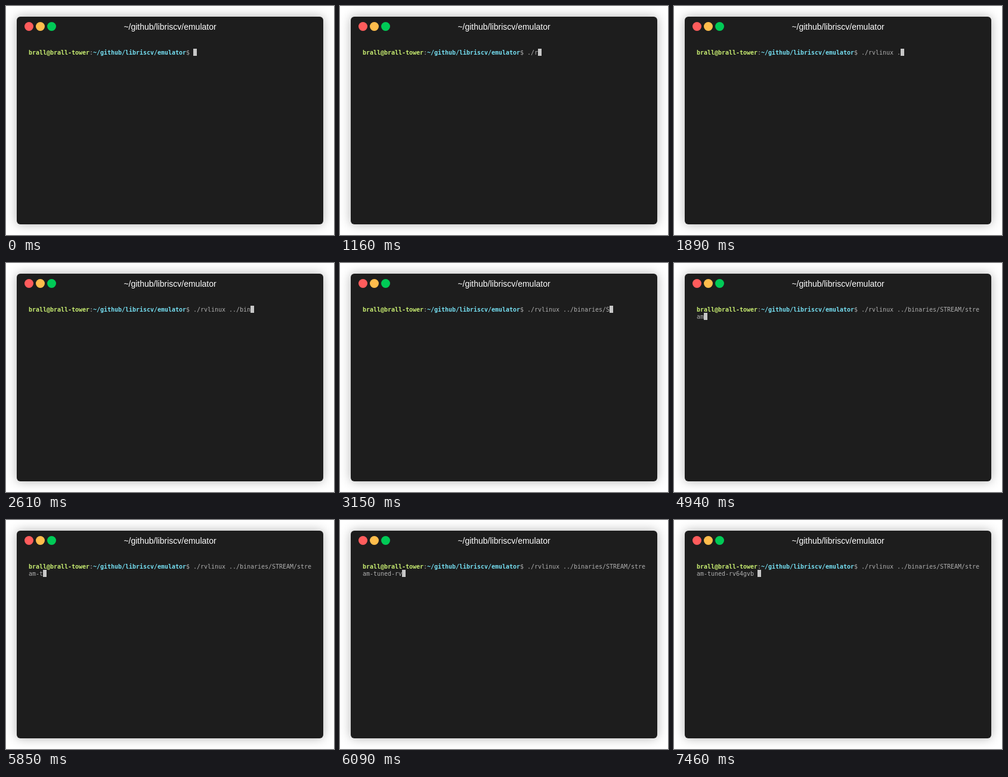
Write an HTML page with a canvas that moves like this. It is 550x386 px and loops after 8 s.

```html
<!DOCTYPE html>
<html lang="en">
<head>
<meta charset="utf-8">
<title>Terminal</title>
<style>
  html, body { margin: 0; width: 100%; height: 100%; overflow: hidden; background: #fff; }
  .window {
    position: absolute; left: 18px; top: 18px; width: 514px; height: 350px;
    border-radius: 6px; background: #1d1d1d; box-shadow: 0 0 18px rgba(0, 0, 0, 0.3);
  }
  .buttons { position: absolute; left: 13px; top: 9px; display: flex; gap: 4px; }
  .buttons i { width: 15px; height: 15px; border-radius: 50%; }
  .title {
    position: absolute; left: 0; right: 0; top: 9px; text-align: center; color: #fff;
    font: 14px/16px "Liberation Sans", Arial, sans-serif;
  }
  canvas { position: absolute; left: 20px; top: 54px; }
</style>
</head>
<body>
<div class="window">
  <div class="buttons">
    <i style="background: #ff5c5c"></i>
    <i style="background: #ffbd4c"></i>
    <i style="background: #00ca56"></i>
  </div>
  <div class="title">~/github/libriscv/emulator</div>
  <canvas id="screen" width="474" height="276"></canvas>
</div>
<script>
const ctx = document.getElementById('screen').getContext('2d');
const LOOP = 8000;
const COLS = 79, CELL_W = 6, CELL_H = 12, BASELINE = 10;
const MONO = '10px "DejaVu Sans Mono", monospace';
const GRAY = '#afafaf';

const PROMPT = [
  ['brall@brall-tower', '#c8ed71', true],
  [':', GRAY, false],
  ['~/github/libriscv/emulator', '#75dff2', true],
  ['$ ', GRAY, false],
];

// Typing bursts: start and pace in ms, then what each keystroke adds
// (the longer pieces are tab completions)
const BURSTS = [
  { start: 500, pace: 370, keys: './' },
  { start: 1160, pace: 108, keys: 'r v l i', completion: 'nux ' },
  { start: 1890, pace: 120, keys: '../' },
  { start: 2480, pace: 65, keys: 'bin' },
  { start: 2730, completion: 'aries/' },
  { start: 3150, pace: 110, keys: 'ST' },
  { start: 3440, pace: 310, keys: 'R', completion: 'EAM/' },
  { start: 4570, pace: 60, keys: 'st' },
  { start: 4820, pace: 120, keys: 'r', completion: 'eam' },
  { start: 5550, keys: '-' },
  { start: 5850, pace: 80, keys: 'tun', completion: 'ed-rv' },
  { start: 7100, pace: 90, keys: '64' },
  { start: 7460, completion: 'gvb ' },
];

function typedAt(time) {
  let typed = '';
  for (const { start, pace = 0, keys = '', completion = '' } of BURSTS) {
    const pieces = [...keys.replaceAll(' ', ''), completion];
    typed += pieces.filter((_, i) => time >= start + i * pace).join('');
  }
  return typed;
}

function cellOrigin(index) {
  return [index % COLS * CELL_W, Math.floor(index / COLS) * CELL_H];
}

// Writes text on the character grid and returns the next free cell
function write(text, start, color, bold) {
  ctx.font = (bold ? 'bold ' : '') + MONO;
  ctx.fillStyle = color;
  [...text].forEach((char, i) => {
    const [x, y] = cellOrigin(start + i);
    ctx.fillText(char, x, y + BASELINE);
  });
  return start + text.length;
}

function draw(time) {
  ctx.clearRect(0, 0, 474, 276);
  let cell = 0;
  for (const [text, color, bold] of PROMPT) cell = write(text, cell, color, bold);
  cell = write(typedAt(time), cell, GRAY, false);
  ctx.fillStyle = '#c7c7c7';
  ctx.fillRect(...cellOrigin(cell), CELL_W, CELL_H);
}

const startTime = performance.now();
function tick() {
  draw((performance.now() - startTime) % LOOP);
  requestAnimationFrame(tick);
}
tick();
</script>
</body>
</html>
```
